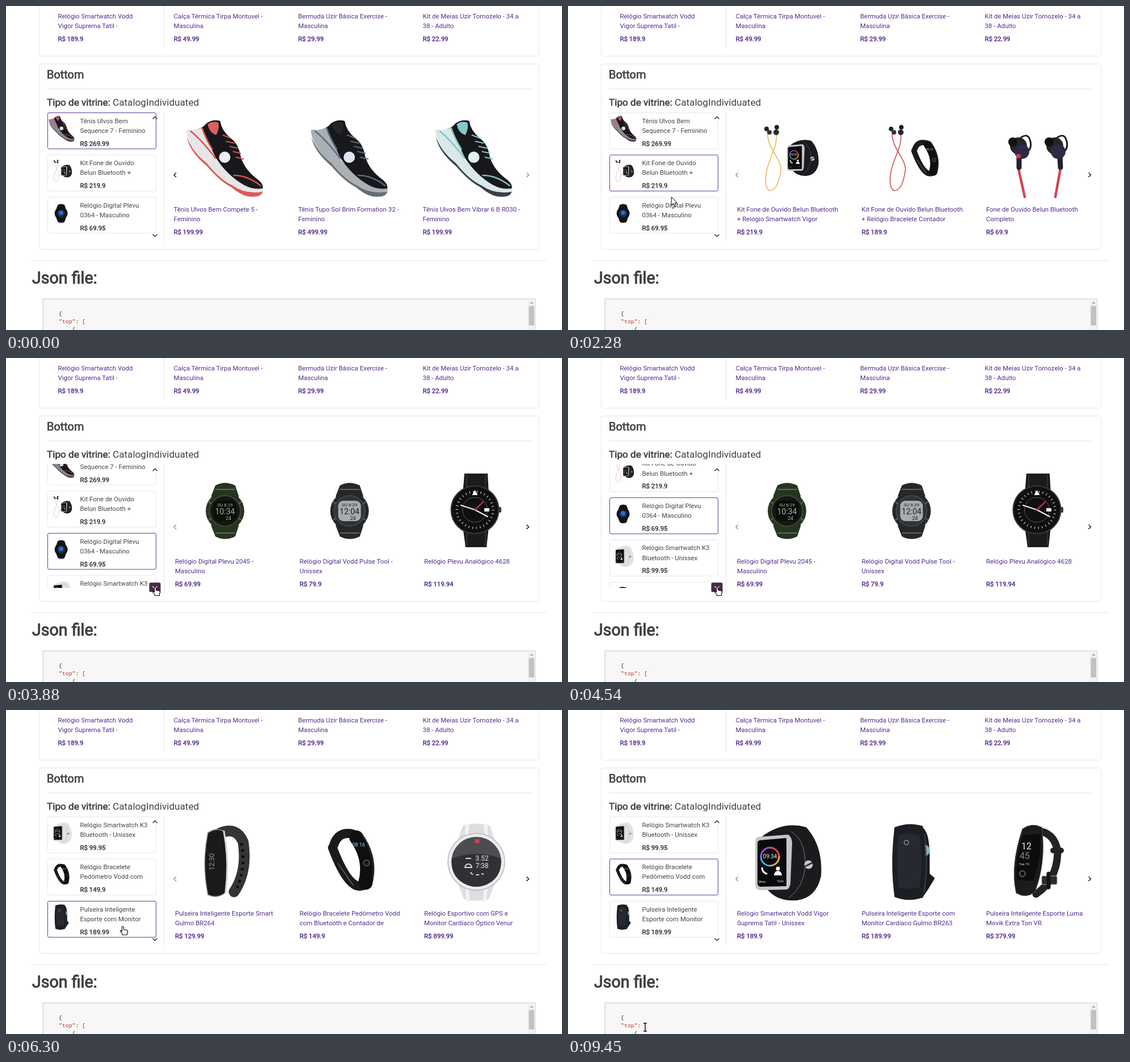
Animation, 980 px wide and 572 px high, one loop 9480 ms. Source, as an HTML page:

```html
<!DOCTYPE html>
<html lang="pt">
<head>
<meta charset="utf-8">
<title>Vitrine</title>
<style>
html, body { margin: 0; width: 100%; height: 100%; overflow: hidden; background: #fff; }
svg { display: block; width: 980px; height: 572px; font: 11.43px Roboto, sans-serif; }
.link { fill: #532c8c; }
.item { fill: #464446; }
.price { stroke-width: .42px; }
.link.price { stroke: #532c8c; }
.item.price { fill: #333; stroke: #333; }
.head { fill: #444041; stroke: #444041; }
.code { font: 9.8px "Liberation Mono", monospace; }
</style>
</head>
<body>
<svg id="stage" viewBox="0 0 980 572"></svg>
<script>
const LOOP = 9480, PITCH = 74.5;

// Drawing helpers
const path = (d, fill = 'none', stroke = 'none', w = 1) =>
  `<path d="${d}" fill="${fill}" stroke="${stroke}" stroke-width="${w}" stroke-linecap="round" stroke-linejoin="round"/>`;
const disc = (x, y, r, fill, stroke = 'none', w = 1) =>
  `<circle cx="${x}" cy="${y}" r="${r}" fill="${fill}" stroke="${stroke}" stroke-width="${w}"/>`;
const box = (x, y, w, h, fill, rx = 0, stroke = 'none', attrs = '') =>
  `<rect x="${x}" y="${y}" width="${w}" height="${h}" rx="${rx}" fill="${fill}" stroke="${stroke}" ${attrs}/>`;
const text = (x, y, s, cls = '', attrs = '') => `<text x="${x}" y="${y}" class="${cls}" ${attrs}>${s}</text>`;
const label = (x, y, s, size, fill = '#eee') =>
  text(x, y, s, '', `font-size="${size}" fill="${fill}" text-anchor="middle"`);
const group = (x, y, s, content) => `<g transform="translate(${x} ${y}) scale(${s})">${content}</g>`;

// Product art, each in a 136 x 136 square
const shoe = (sole, mid, accent, lining, mark) =>
  path('M0 19Q6 14 13 22L54 72Q88 106 135 119Q139 133 124 135Q102 138 80 118Q60 108 38 80Q5 52 0 19Z', mid) +
  path('M1 30Q12 58 36 76Q60 106 82 116Q104 132 135 127Q132 136 120 135.5Q102 138 80 119Q60 109 37 82Q6 56 1 30Z', sole) +
  path('M9 19Q28 17 36 6Q48-2 60 2Q62 18 78 32Q92 42 95 60Q100 84 122 102Q137 112 135 121Q118 124 102 115Q72 98 51 65Q32 38 9 19Z', '#18181c') +
  path('M5 18Q20 18 28 14Q36 34 52 66Q30 48 5 18Z', mid) +
  path('M38 8Q46 1 57 5Q59 16 53 27Q40 22 38 8Z', lining) +
  path('M8 20Q28 36 52 68M28 14Q34 32 46 52M84 98Q108 98 131 116', 'none', accent, 2.5) +
  path('M65 27l13 5m-7 6l14 3m-8 6l14 3m-8 6l13 3m-8 7l13 3', 'none', accent, 2) +
  disc(68, 66, 10, mark);

const smartwatch = (strap, metal) =>
  path('M20 24Q58-6 100 6Q130 40 126 92Q118 130 84 135Q48 138 30 114Z', strap) +
  path('M74 14Q100 30 98 78Q94 112 70 130', 'none', '#77777f', 1) +
  disc(104, 72, 7.5, '#c8c8cc') + path('M98 75l12-6', 'none', '#333', 3) +
  path('M16 23L68 19Q75 24 75 34L72 106Q70 116 64 116L18 117Q10 116 10 108V32Q10 24 16 23Z', metal) +
  path('M18 29L65 25V110L19 111Q14 110 14 105V35Q14 30 18 29Z', '#0a0a0e') +
  path('M36 42A16 16 0 0 1 52 58', 'none', '#e8434f', 3) + path('M52 58A16 16 0 0 1 36 74', 'none', '#f1b82d', 3) +
  path('M36 74A16 16 0 0 1 20 58', 'none', '#38b6e0', 3) + path('M20 58A16 16 0 0 1 36 42', 'none', '#9a55cf', 3) +
  label(36, 61, '09:34', 10) + path('M22 78q1 8 8 10', 'none', '#fff', 3) +
  disc(50, 79, 3.5, '#fff') + path('M43 91q1-8 7-8t7 8z', '#fff') +
  label(22, 104, 'Menu', 5) + label(54, 103, 'Tools', 5);

const bracelet = () =>
  path('M38 38Q46 12 72 18Q100 50 92 108Q66 122 36 42', 'none', '#1a1a1c', 16) +
  path('M46 70L72 108', 'none', '#555', 2) +
  path('M78 24Q105 62 94 104', 'none', '#0f0f11', 25) +
  path('M89 20Q112 56 107 96', 'none', '#4a4a4e', 1) +
  label(82, 40, '08 16', 9, '#a9d6f2') + disc(96, 69, 5, 'none', '#555', 2);

const kit = (cable, gadget) =>
  path('M32 22C30 50 58 70 55 90Q50 124 36 125Q26 122 29 96C32 70 50 50 47 24', 'none', cable, 1.6) +
  disc(30, 16, 4, '#1d1d24') + disc(35, 22, 4, '#30303a') + disc(48, 13, 4, '#1d1d24') +
  disc(47, 22, 5, '#2a2a33') + gadget;

const bud = x => path(`M${x} 34q16-14 20 4t-14 22`, 'none', '#1c1d24', 3) +
  disc(x - 1, 46, 15, '#24242d') + disc(x + 5, 56, 13, '#2e2a45') + disc(x - 11, 39, 8, '#111');
const earphones = () =>
  path('M35 86L46 136M109 86L100 136', 'none', '#cf4650', 4.5) +
  path('M36 64L36 84M108 64L109 84', 'none', '#22222a', 9) + bud(36) + bud(100) + disc(35, 64, 4, '#d63a48');

const watchBody = fill =>
  path('M49 24Q66 15 84 24L90 42V96L84 114Q66 123 49 114L42 96V42Z', fill) + disc(66, 69, 34, fill);
const digital = (body, bezel, lcd, ink, time) => watchBody(body) +
  path('M50 31h33M50 108h33M38 53l5 5M38 85l5-5M94 53l-5 5M94 85l-5-5', 'none', '#65675b', 2) +
  disc(66, 69, 27, bezel, '#4a4c4a', 1.5) + box(46, 51, 40, 36, lcd, 9) +
  label(66, 61, 'SU 8·29', 8, ink) + label(66, 75, time, 14, ink) + label(72, 85, '24', 9, ink);
const blueWatch = () => watchBody('#131316') + disc(66, 69, 20, '#18335f') + disc(66, 66, 11, '#2f6fc0');

const analog = () =>
  path('M49 3H90L92 40V96L88 133H51L46 96V40Z', '#1b1b1d') +
  path('M53 5V130M86 5V130', 'none', '#48484b', 1) + box(108, 62, 6, 10, '#3b3b3e', 2) +
  disc(67.5, 67, 42, '#101012', '#38383c', 2) +
  `<circle cx="67.5" cy="67" r="32" fill="none" stroke="#e8e8e8" stroke-width="4" stroke-dasharray="1 5.7"/>` +
  disc(67.5, 67, 22, 'none', '#5a5a5d', 1) +
  path('M67.5 32l5 9h-10z', '#fff') + box(84, 64, 9, 6, '#eee', 1) +
  path('M67.5 67L43 59M67.5 67L90 79', 'none', '#f0f0f0', 2) + path('M67.5 67L82 53', 'none', '#d8374e', 2);

const slimBand = () =>
  path('M58 16Q86 4 98 32Q106 84 82 120', 'none', '#353538', 19) +
  `<path d="M95 34Q104 80 84 120" fill="none" stroke="#0c0c0d" stroke-width="5" stroke-dasharray="4 7"/>` +
  path('M36 16Q50 6 64 13Q74 66 67 121Q52 133 36 125Q25 70 36 16Z', '#1a1a1c', '#77777b', 1.5) +
  path('M64 13Q74 66 67 121', 'none', '#d6d6da', 3) +
  `<g transform="translate(42 82) rotate(-90)">${text(0, 5, '12:30', '', 'font-size="12" fill="#999"')}</g>`;

const sportWatch = () =>
  path('M46 3Q70-4 94 3L106 40V96L92 133Q70 139 48 133L34 96V40Z', '#dddee1') +
  path('M54 2Q50 60 55 134M86 2Q92 60 85 134', 'none', '#f3f3f4', 6) +
  disc(70, 67, 50, '#ececee', '#b9babf', 1.5) + disc(70, 67, 44, '#4b4d52') +
  path('M27 61Q70 45 113 61Q116 92 92 105Q70 117 48 105Q24 92 27 61Z', '#2f3136') +
  box(68, 27, 7, 7, '#d54550') + label(80, 65, '3.52', 12) + label(80, 78, '7:38', 12) +
  path('M50 77a6 6 0 1 1 12 0zM52 61h8', 'none', '#ddd', 2) + path('M60 86l3 3m7 1h4m6-2l2 1', 'none', '#ddd', 2);

const wideBand = () =>
  path('M84 6Q98 12 98 60V88L107 96 95 116 84 132Z', '#17191c') + disc(87, 47, 11, '#86b4cb') +
  path('M36 6Q62-4 86 4Q96 66 86 130Q60 139 36 129Q28 70 36 6Z', '#1b1e22') +
  path('M43 20Q62 14 80 20Q87 68 80 112Q60 118 43 112Q38 66 43 20Z', '#262a30') +
  path('M89 18Q96 66 88 122', 'none', '#444a51', 1.5) + disc(57, 33, 4, 'none', '#8b929a', 1.5);

const fitBand = () =>
  path('M66 12Q98 14 104 48Q104 98 66 124', 'none', '#232326', 13) + path('M96 47h14', 'none', '#222', 10) +
  box(76, 92, 27, 15, '#2b2b2e', 2, '#a5a5aa') + path('M88 88v24', 'none', '#151517', 7) +
  path('M42 9Q58-3 76 6Q84 68 64 120Q48 133 31 122Q20 74 42 9Z', '#1b1b1e', '#4b4b50', 1) +
  path('M44 20L73 18Q76 64 60 101L32 99Q28 60 44 20Z', '#0c0c0e') +
  label(49, 45, '12', 16) + label(46, 62, '45', 16, '#888') + label(45, 73, 'Tue 19', 6) + disc(42, 88, 5, 'none', '#777', 1.5);

// Content: [line 1, line 2, price, art]
const topRow = [
  ['Relógio Smartwatch Vodd', 'Vigor Suprema Tatil -', '189.9'],
  ['Calça Térmica Tirpa Montuvel -', 'Masculina', '49.99'],
  ['Bermuda Uzir Básica Exercise -', 'Masculina', '29.99'],
  ['Kit de Meias Uzir Tornozelo - 34 a', '38 - Adulto', '22.99']];
const history = [
  ['Tênis Ulvos Bem', 'Sequence 7 - Feminino', '269.99', shoe('#3a3a44', '#8b8792', '#e0527c', '#b8486a', '#dcdce4')],
  ['Kit Fone de Ouvido', 'Belun Bluetooth +', '219.9', kit('#e79a9a', group(60, 34, .5, smartwatch('#222', '#b9babf')))],
  ['Relógio Digital Plevu', '0364 - Masculino', '69.95', blueWatch()],
  ['Relógio Smartwatch K3', 'Bluetooth - Unissex', '99.95', group(16, 12, .84, smartwatch('#e4e2df', '#d8d2cc'))],
  ['Relógio Bracelete', 'Pedômetro Vodd com', '149.9', bracelet()],
  ['Pulseira Inteligente', 'Esporte com Monitor', '189.99', wideBand()]];
const showcases = [
  [['Tênis Ulvos Bem Compete 5 -', 'Feminino', '199.99', shoe('#dd5a55', '#e6e6e8', '#d9504f', '#d9605e', '#eef0f2')],
   ['Tênis Tupo Sol Brim Formation 32 -', 'Feminino', '499.99', shoe('#656d72', '#aab1b4', '#5c6a80', '#24252b', '#e2e5f1')],
   ['Tênis Ulvos Bem Vibrar 6 B R030 -', 'Feminino', '199.99', shoe('#3b4048', '#dbe8e9', '#7fc4c6', '#86c9ca', '#dff0f0')]],
  [['Kit Fone de Ouvido Belun Bluetooth', '+ Relógio Smartwatch Vigor', '219.9', kit('#e8b94f', group(61, 34, .48, smartwatch('#1b1b1e', '#c5c6ca')))],
   ['Kit Fone de Ouvido Belun Bluetooth', '+ Relógio Bracelete Contador', '189.9', kit('#cf4a50', group(49, 30, .59, bracelet()))],
   ['Fone de Ouvido Belun Bluetooth', 'Completo', '69.9', earphones()]],
  [['Relógio Digital Plevu 2045 -', 'Masculino', '69.99', digital('#26351f', '#15180f', '#0b0d0b', '#a9b3a0', '10:34')],
   ['Relógio Digital Vodd Pulse Tool -', 'Unissex', '79.9', digital('#25272a', '#303336', '#a6adae', '#1d2022', '12:04')],
   ['Relógio Plevu Analógico 4628', '', '119.94', analog()]],
  [['Pulseira Inteligente Esporte Smart', 'Gulmo BR264', '129.99', slimBand()],
   ['Relógio Bracelete Pedômetro Vodd', 'com Bluetooth e Contador de', '149.9', bracelet()],
   ['Relógio Esportivo com GPS e', 'Monitor Cardíaco Óptico Venur', '899.99', sportWatch()]],
  [['Relógio Smartwatch Vodd Vigor', 'Suprema Tatil - Unissex', '189.9', smartwatch('#1b1b1e', '#c5c6ca')],
   ['Pulseira Inteligente Esporte com', 'Monitor Cardíaco Gulmo BR263', '189.99', wideBand()],
   ['Pulseira Inteligente Esporte Luma', 'Movik Extra Ton VR', '379.99', fitBand()]]];

const caption = (x, y, [a, b, price], cls) =>
  text(x, y, a, cls) + text(x, y + 17.15, b, cls) + text(x, y + 40, 'R$ ' + price, cls + ' price');
const heading = (x, y, s, size) =>
  text(x, y, s, 'head', `font-size="${size}" stroke-width="${size / 27}"`);
const line = d => path(d, 'none', '#e6e6e6');
const chevron = (d, id) => `<g id="${id}">${path(d, 'none', 'currentColor', 1.6)}</g>`;

const card = (item, i) => group(73.5, 188.5 + PITCH * i, 1,
  box(0, 0, 191, 63.7, '#fff', 2.5, '#e8e8e8', 'class="frame"') +
  group(1.5, 5.5, .335, item[3]) + caption(57, 18.2, item, 'item'));
const showcase = (set, n) => `<g class="set">${set.map((item, i) => {
  const x = (n ? 298 : 295.5) + 219.5 * i;
  return group(x + 22, 201, 1, item[3]) + caption(x, 363, item, 'link');
}).join('')}</g>`;

const stage = document.getElementById('stage');
stage.innerHTML =
  `<clipPath id="window"><path d="M72 187H268V406H72Z"/></clipPath>` +
  box(58.5, -20, 881, 108.5, '#fff', 3, '#e8e8e8') + box(58.5, 102.5, 881, 327, '#fff', 3, '#e8e8e8') +
  line('M278.5 0V75M278.5 188V416M72 146.5H926M45 449.5H952') +
  topRow.map((item, i) => caption(i ? 76 + 219.5 * i : 91.5, 22, item, 'link')).join('') +
  heading(72, 128, 'Bottom', 19.9) + heading(72, 175.5, 'Tipo de vitrine:', 17.15) +
  text(188, 175.5, 'CatalogIndividuated', '', 'font-size="17.15" fill="#444041"') +
  heading(46, 489.5, 'Json file:', 28.6) +
  box(65, 517, 868, 70, '#f7f7f6', 0, '#c8c8c8') + box(920, 517.5, 12.5, 60, '#f1f1f1') +
  path('M923.5 525.5l3-3.5 3 3.5z', '#a3a3a3') + box(921.5, 529.5, 9.5, 34.5, '#c1c1c1') +
  text(93, 545.5, '{', 'code', 'fill="#333"') +
  text(93, 559.5, '<tspan fill="#c0282d">"top"</tspan>: <tspan fill="#a03030">[</tspan>', 'code', 'fill="#333"') +
  text(116.5, 574, '{', 'code', 'fill="#333"') +
  `<g clip-path="url(#window)"><g id="list">${history.map(card).join('')}</g></g>` +
  showcases.map(showcase).join('') +
  path('M259 199l3.5-3.5 3.5 3.5', 'none', '#333', 1.6) +
  box(252.5, 396.5, 20, 16.5, '#4b2a48', 2.5, 'none', 'id="button"') +
  chevron('M259 403.5l3.5 3.5 3.5-3.5', 'down') +
  chevron('M299.5 294.8l-3.5 3.4 3.5 3.4', 'prev') + chevron('M918 294.8l3.5 3.4-3.5 3.4', 'next') +
  `<g id="cursor"><g>${path('M0 0V14L3.4 11 5.8 16.4 8.2 15.3 5.9 10.2H10.2Z', '#fff', '#000')}</g>
  <g>${path('M-1.5 9V1.5Q-1.5 0 0 0T1.5 1.5V5.5L7 6.5Q9 7 8.6 9.5L7.5 12V15H-1V13L-4.5 9Q-5 7-3 7.5Z', '#fff', '#000', 1.1)}</g>
  <g>${['#fff', '#000'].map((c, i) => path('M-2.5-7H2.5M0-7V7M-2.5 7H2.5', 'none', c, 3 - i * 1.6)).join('')}</g></g>`;

// Motion
const clicks = [1830, 2810, 5990, 7710], picked = [0, 1, 2, 5, 4];
const scrolls = [3763, 4458, 5090];
const moves = [
  [330, 897, 537], [1060, 187, 298], [1940, 187, 298], [2620, 177.5, 377], [2950, 177.5, 377],
  [3720, 263, 404.5], [5540, 263, 404.5], [5840, 206, 382], [6450, 206, 382], [6950, 201, 361],
  [7310, 264, 287], [8430, 264, 287], [9350, 135, 565], [9450, 136, 560]];

const clamp = v => Math.min(1, Math.max(0, v));
const smooth = v => v * v * (3 - 2 * v);
const bezier = (a, b, u) => 3 * a * u * (1 - u) ** 2 + 3 * b * u * u * (1 - u) + u ** 3;
function ease(x) {
  let lo = 0, hi = 1;
  for (let i = 0; i < 20; i++) {
    const mid = (lo + hi) / 2;
    if (bezier(.25, .25, mid) < x) lo = mid; else hi = mid;
  }
  return bezier(.1, 1, lo);
}

function cursorAt(t) {
  const i = moves.findIndex(m => m[0] > t);
  if (i < 0) return moves.at(-1).slice(1);
  const [t0, x0, y0] = moves[i - 1], [t1, x1, y1] = moves[i], k = smooth((t - t0) / (t1 - t0));
  return [x0 + (x1 - x0) * k, y0 + (y1 - y0) * k];
}

const $ = id => document.getElementById(id);
const frames = stage.querySelectorAll('.frame'), sets = stage.querySelectorAll('.set');
const show = (el, on) => { el.style.display = on ? '' : 'none'; };
const inside = (x, y, l, t, r, b) => x >= l && x <= r && y >= t && y <= b;

function render(t) {
  const state = clicks.filter(c => t >= c).length;
  const offset = scrolls.reduce((sum, s) => sum + PITCH * ease(clamp((t - s) / 500)), 0);
  $('list').setAttribute('transform', `translate(0 ${-offset})`);
  frames.forEach((f, i) => f.setAttribute('stroke', i === picked[state] ? '#623a98' : '#e8e8e8'));
  sets.forEach((s, i) => show(s, i === state));
  $('prev').style.color = state ? '#999' : '#222';
  $('next').style.color = state ? '#222' : '#999';

  const visible = t >= moves[0][0];
  const [x, y] = visible ? cursorAt(t) : [0, 0];
  const onButton = inside(x, y, 252, 396, 273, 413);
  const cardY = (y - 188 + offset) % PITCH;
  const onCard = inside(x, y, 73, 188, 265, 402) && cardY > 1.5 && cardY < 65;
  const onProduct = inside(x, y, 296, 200, 900, 405);
  const kind = inside(x, y, 65, 517, 920, 572) ? 2 : onButton || onCard || onProduct ? 1 : 0;
  show($('button'), onButton);
  $('down').style.color = onButton ? '#fff' : '#333';
  show($('cursor'), visible);
  $('cursor').setAttribute('transform', `translate(${x} ${y})`);
  [...$('cursor').children].forEach((c, i) => show(c, i === kind));
}

const start = performance.now();
function tick() {
  render((performance.now() - start) % LOOP);
  requestAnimationFrame(tick);
}
tick();
</script>
</body>
</html>
```
